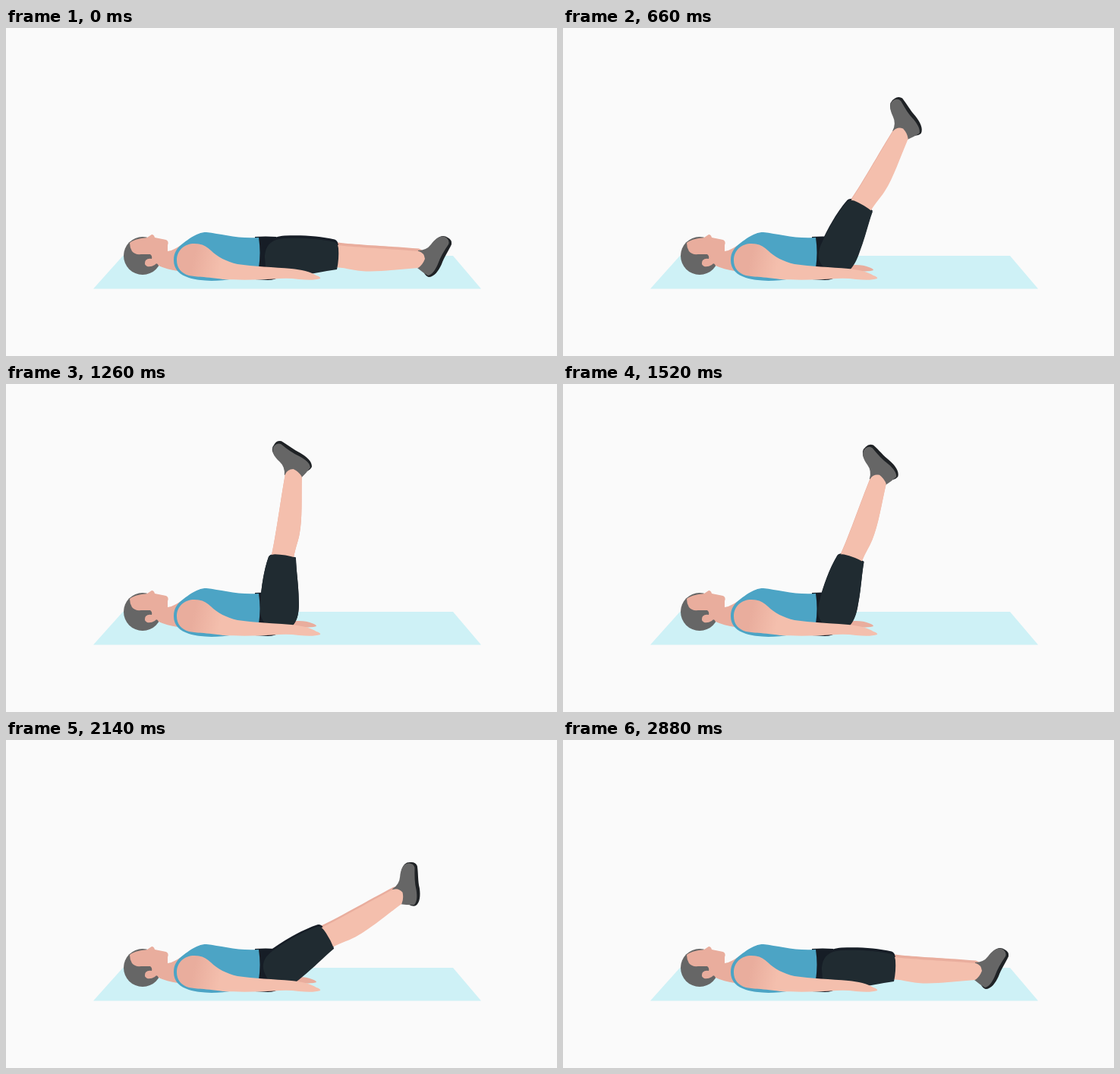
Recreate the animation shown at these times as an HTML page. Size 726 by 432 pixels, loop 2900 ms.

```html
<!DOCTYPE html>
<html lang="en">
<head>
<meta charset="utf-8">
<title>Leg raise</title>
<style>
  html, body { margin: 0; width: 100%; height: 100%; overflow: hidden; background: #fafafa; }
  svg { display: block; width: 726px; height: 432px; }
  .light { fill: #f4bfad; }
  .shade { fill: #e9ad9d; }
  .shirt { fill: #4ca4c5; }
  .shorts { fill: #202b31; }
  .shorts-dark { fill: #161d26; }
  .grey { fill: #666; }
  .sole { fill: #1f2225; }
</style>
</head>
<body>
<svg viewBox="0 0 726 432">
  <defs>
    <linearGradient id="armTone" gradientUnits="userSpaceOnUse" x1="248" y1="300" x2="284" y2="308">
      <stop offset="0" stop-color="#e9ad9d"/>
      <stop offset="1" stop-color="#f4bfad"/>
    </linearGradient>
    <path id="thigh" d="M341 303C341 285 351 278 367 277C388 276 413 277 433 282Q437 283 438 290Q439 304 436 318C419 320 400 325 380 327C360 330 345 326 342 315Z"/>
    <path id="shin" d="M430 285C455 289 510 291 544 294Q551 296 552 304Q549 312 543 316C515 318 488 322 468 320C455 319 446 315 430 315Z"/>
  </defs>

  <path fill="#cef1f6" d="M154 300H589L626 343.5H115Z"/>

  <!-- head -->
  <circle class="grey" cx="180" cy="300" r="25"/>
  <path class="shade" d="M163 283C169 278 179 277 186 276L192 272Q195 272 196 276L211 279Q215 281 213 286L213 294Q219 293 224 290L234 284L242 310L226 320Q212 318 201 313Q199 308 196 312Q191 315 186 314Q181 311 184 306Q187 303 192 304Q193 300 190 298L178 298Q170 299 166 294Q163 289 163 283Z"/>

  <!-- far hand and hips -->
  <path class="shade" d="M372 313Q392 310 403 315Q409 317 409 319Q404 321 376 321Z"/>
  <path class="shorts-dark" d="M328 275Q342 274 356 275L362 290L361 327Q355 332 345 332L328 331Z"/>

  <g id="farLeg">
    <use href="#shin" class="shade"/>
    <use href="#thigh" class="shorts-dark"/>
  </g>
  <g id="nearLeg">
    <path class="sole" d="M567 278Q575 271 582 276Q588 279 587 285C583 294 577 302 574 311C570 320 564 328 557 328Q553 327 550 321Z"/>
    <path class="grey" d="M543 293Q554 293 560 285C566 277 573 272 580 276Q585 280 583 285C577 294 572 302 569 311C565 320 561 325 556 326Q549 322 542 316Z"/>
    <use href="#shin" class="light"/>
    <use href="#thigh" class="shorts"/>
  </g>

  <!-- torso and near arm -->
  <path class="shirt" d="M221 306C221 295 226 289 234 283C243 276 253 269 264 269C284 271 305 278 333 276Q336 296 333 316L300 330C280 334 257 334 241 329C229 325 221 318 221 306Z"/>
  <path fill="url(#armTone)" d="M225 306C225 292 236 284 248 284C258 284 264 287 270 293C278 301 291 308 305 311C326 314 353 315 376 317C388 318 402 321 409 326Q415 328 414 330Q405 333 386 331Q373 329 360 330C334 332 306 332 286 331C265 328 252 328 241 326C231 323 225 316 225 306Z"/>
</svg>
<script>
  const LOOP = 2900, STEP = 20, TOP_ANGLE = 90;
  const RAISE_START = 100, RAISE_END = 1040, LOWER_END = 2880;
  const HIP = "360 303";
  const nearLeg = document.getElementById("nearLeg");
  const farLeg = document.getElementById("farLeg");

  function easeInOut(p, power) {
    p = Math.min(1, Math.max(0, p));
    const half = x => Math.pow(2 * x, power) / 2;
    return p < 0.5 ? half(p) : 1 - half(1 - p);
  }

  function legAngle(t) {
    if (t < RAISE_END) {
      return TOP_ANGLE * easeInOut((t - RAISE_START) / (RAISE_END - RAISE_START), 2.4);
    }
    return TOP_ANGLE * (1 - easeInOut((t - RAISE_END) / (LOWER_END - RAISE_END), 1.5));
  }

  function render(time) {
    const t = Math.floor((time % LOOP) / STEP) * STEP;
    const angle = legAngle(t);
    const turn = `rotate(${-angle} ${HIP})`;
    const lift = -3.5 * Math.cos(angle * Math.PI / 180);
    nearLeg.setAttribute("transform", turn);
    farLeg.setAttribute("transform", `translate(0 ${lift}) ${turn}`);
  }

  const start = performance.now();
  function tick() {
    render(performance.now() - start);
    requestAnimationFrame(tick);
  }
  tick();
</script>
</body>
</html>
```
